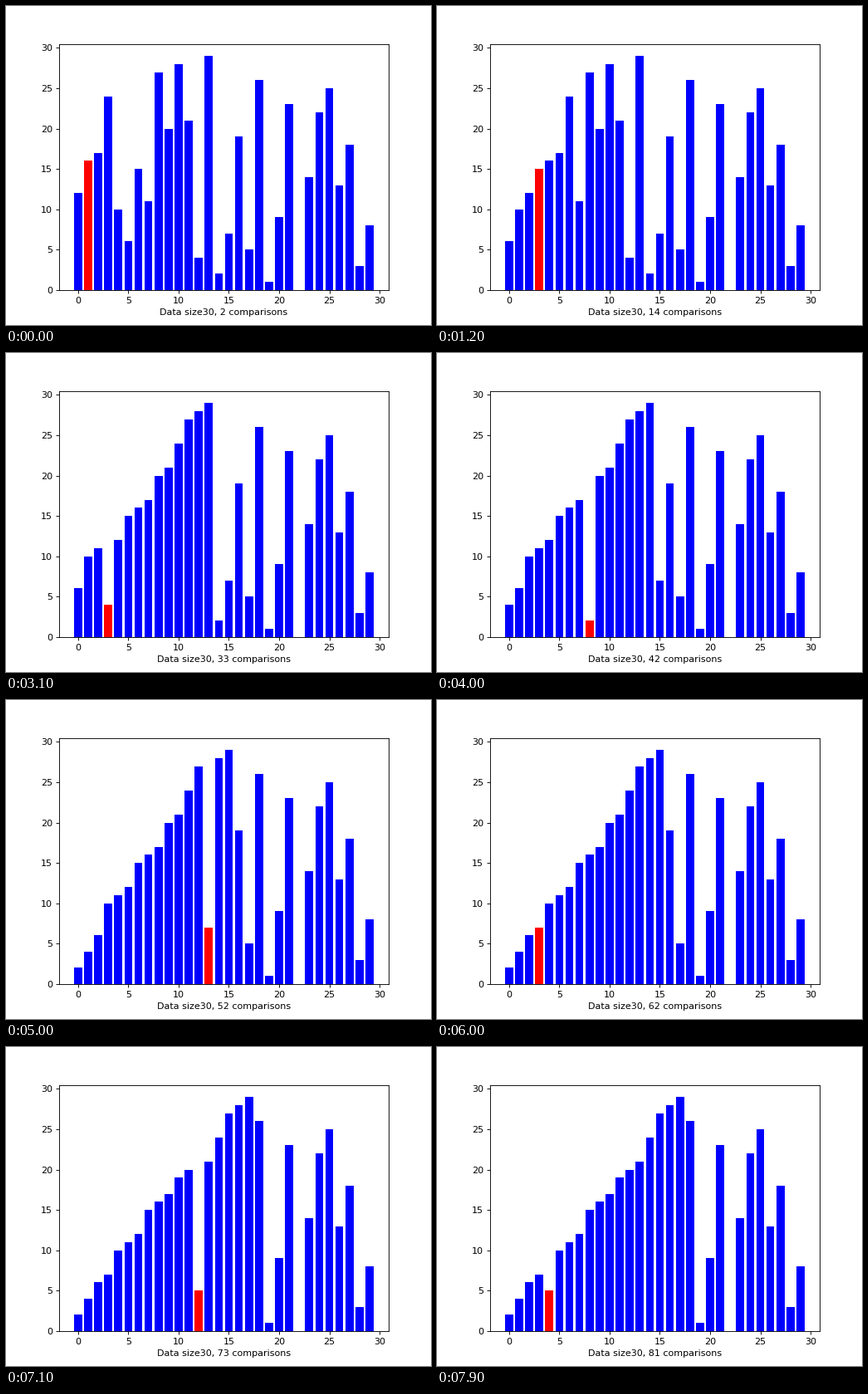
These frames come from a looping animation (512x384 px, 8000 ms). A matplotlib script:

```python
from itertools import islice

import matplotlib.pyplot as plt
from matplotlib.animation import FuncAnimation

# The unsorted input; every later state follows from sorting it.
VALUES = [12, 17, 24, 16, 10, 6, 15, 11, 27, 20, 28, 21, 4, 29, 2,
          7, 19, 5, 26, 1, 9, 23, 0, 14, 22, 25, 13, 18, 3, 8]
FIRST_COUNT = 2
FRAMES = 80
INTERVAL = 100


def insertion_steps(values):
    """Yield the list and the index of the moving value after each swap."""
    data = list(values)
    for i in range(1, len(data)):
        j = i
        while j > 0 and data[j] < data[j - 1]:
            data[j - 1], data[j] = data[j], data[j - 1]
            j -= 1
            yield list(data), j


start = FIRST_COUNT - 1
steps = list(islice(insertion_steps(VALUES), start, start + FRAMES))

plt.rcParams["text.kerning_factor"] = 6  # whole-pixel letter spacing
fig, ax = plt.subplots(figsize=(6.4, 4.8), dpi=80)
bars = ax.bar(range(len(VALUES)), steps[0][0], color="b")
label = ax.set_xlabel("")


def draw(frame):
    data, active = steps[frame]
    for i, (bar, value) in enumerate(zip(bars, data)):
        bar.set_height(value)
        bar.set_facecolor("r" if i == active else "b")
    label.set_text(f"Data size{len(data)}, {frame + FIRST_COUNT} comparisons")
    return [*bars, label]


anim = FuncAnimation(fig, draw, frames=FRAMES, interval=INTERVAL,
                     init_func=lambda: draw(0), repeat=True, repeat_delay=0)
plt.show()
```
